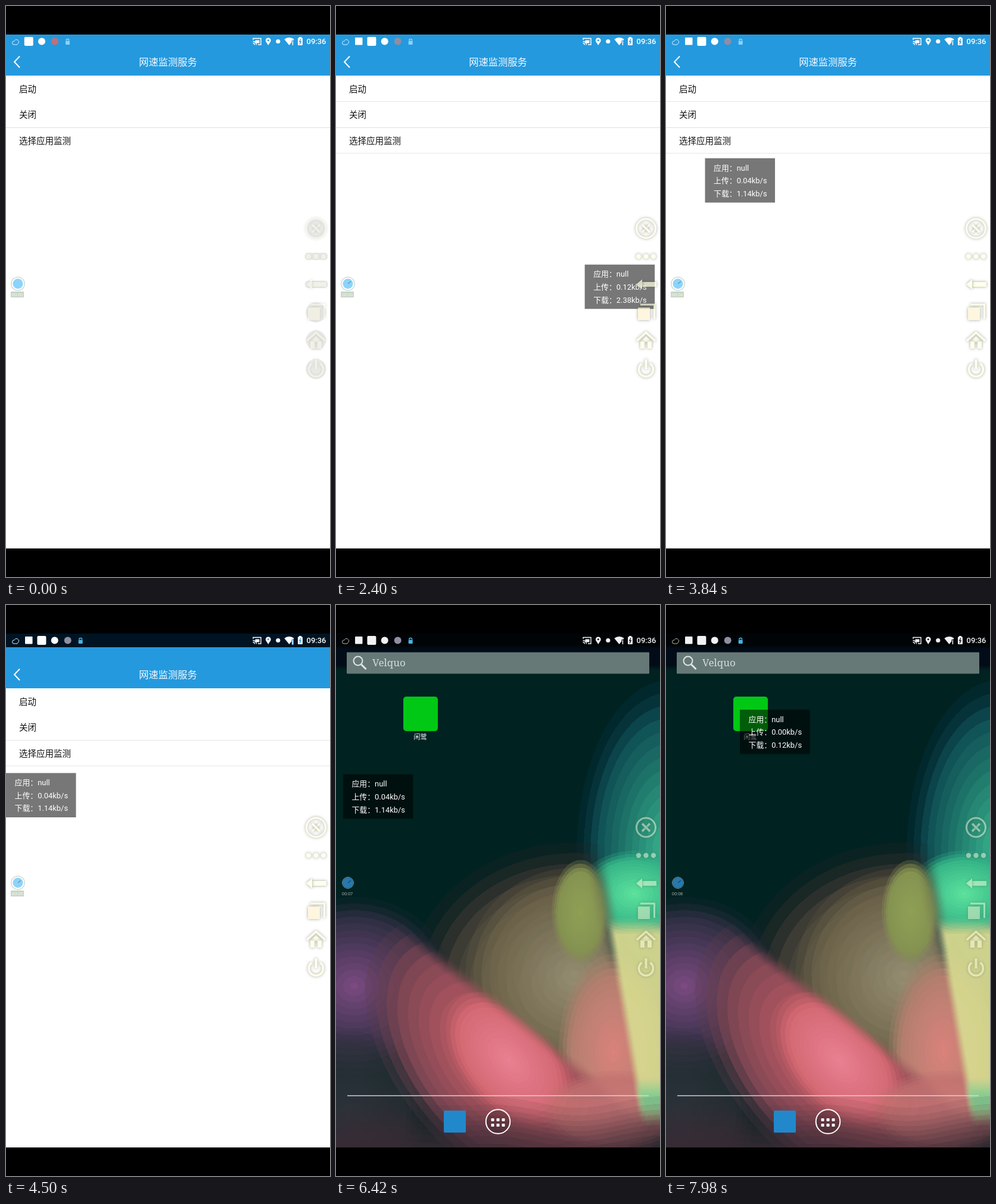
Write an HTML page with a canvas that moves like this. It is 544x960 px and loops after 8 s.

```html
<!DOCTYPE html>
<html lang="zh-CN">
<head>
<meta charset="utf-8">
<style>
html, body { margin: 0; width: 100%; height: 100%; overflow: hidden; background: #000; }
canvas { display: block; width: 544px; height: 960px; }
</style>
</head>
<body>
<canvas id="stage" width="544" height="960"></canvas>
<script>
const W = 544, H = 960, TOP = 48, BOTTOM = 912, LOOP = 8000;
const FONT = 'Roboto, "Noto Sans CJK SC", "Noto Sans CJK", sans-serif';
const BLUE = '#2499de', CREAM = '#ffffe2';
let g = document.getElementById('stage').getContext('2d');

const mix = (a, b, k) => a + (b - a) * k;
const clamp = v => Math.max(0, Math.min(1, v));
const smooth = (from, to, v) => {
  const k = clamp((v - from) / (to - from));
  return k * k * (3 - 2 * k);
};

function box(x, y, w, h, color, r = 0) {
  g.fillStyle = color;
  g.beginPath();
  g.roundRect(x, y, w, h, r);
  g.fill();
}
function dot(x, y, r, color) {
  g.fillStyle = color;
  g.beginPath();
  g.arc(x, y, r, 0, 7);
  g.fill();
}
function ring(x, y, r, color, width, from = 0, to = Math.PI * 2) {
  g.strokeStyle = color;
  g.lineWidth = width;
  g.beginPath();
  g.arc(x, y, r, from, to);
  g.stroke();
}
function trace(points) {
  g.beginPath();
  points.forEach(([x, y]) => g.lineTo(x, y));
}
function poly(points, color) {
  trace(points);
  g.fillStyle = color;
  g.fill();
}
function line(points, color, width) {
  trace(points);
  g.strokeStyle = color;
  g.lineWidth = width;
  g.stroke();
}
function text(str, x, y, size, color, align = 'left', weight = 400, family = FONT) {
  g.font = `${weight} ${size}px ${family}`;
  g.textAlign = align;
  g.fillStyle = color;
  g.fillText(str, x, y);
}
function layer(draw) {
  const c = document.createElement('canvas');
  c.width = W;
  c.height = H;
  const previous = g;
  g = c.getContext('2d');
  draw();
  g = previous;
  return c;
}

// ---- Wallpaper: banded elliptical glows, cut by soft edges ----
const bands = (k, n = 14) => Math.round(k * n) / n;

function shade(x, y) {
  const c = [0, 34, 33];
  const blend = (color, k) => color.forEach((v, i) => { c[i] = mix(c[i], v, k); });
  function glow(cx, cy, rx, ry, rim, core, mask = 1, skew = 0) {
    const dx = x - cx, dy = y - cy - skew * dx;
    const k = bands(1 - Math.hypot(dx / rx, dy / ry));
    if (k <= 0) return;
    blend(rim.map((v, i) => mix(v, core[i], k)), clamp(k * 4) * mask);
  }
  const ridge = 555 + .8 * (x - 130);
  const belowRidge = smooth(-14, 26, y - ridge);
  const wingEdge = 462 + .17 * (y - 560);
  const archSide = 1 - smooth(-25, 20, x - Math.max(432, wingEdge));

  // green fan
  glow(560, 415, 162, 300, [0, 44, 64], [58, 185, 145]);
  glow(500, 485, 100, 75, [40, 165, 128], [92, 226, 156]);
  // olive arch
  glow(400, 640, 290, 250, [26, 26, 30], [146, 140, 106], archSide);
  glow(400, 620, 190, 185, [105, 92, 62], [150, 142, 116], archSide * .75);
  glow(410, 515, 50, 90, [130, 142, 80], [142, 160, 84], archSide);
  // violet and red hills
  glow(30, 640, 170, 155, [20, 36, 44], [122, 74, 128]);
  glow(20, 860, 130, 150, [40, 46, 52], [62, 58, 68], .7);
  glow(465, 750, 95, 170, [165, 125, 105], [218, 130, 124]);
  glow(290, 770, 250, 225, [84, 56, 72], [235, 106, 112], belowRidge, .5);
  glow(290, 765, 110, 105, [206, 98, 106], [232, 128, 146], belowRidge, .5);
  glow(470, 850, 130, 70, [190, 110, 108], [205, 122, 122], .8);
  // yellow wing, green at its foot
  const wing = smooth(-8, 10, x - wingEdge) * smooth(522, 556, y) * (1 - smooth(835, 880, y));
  blend([214, 215, 142], bands(wing) * .95);
  blend([134, 204, 144], wing * smooth(790, 830, y));
  // folds along the bottom
  const fold = y + 9 * Math.sin(x / 85) + 5 * Math.sin(x / 37);
  blend([58, 42, 52], bands(smooth(815, 925, fold), 9) * .82);
  // shaded top
  blend([2, 12, 24], 1 - smooth(100, 110, y));
  blend([0, 4, 6], 1 - smooth(66, 74, y));
  return c;
}
function wallpaper() {
  const image = g.createImageData(W, BOTTOM - TOP);
  for (let i = 0; i < image.data.length; i += 4) {
    const n = i / 4;
    image.data.set([...shade(n % W, TOP + Math.floor(n / W)), 255], i);
  }
  g.putImageData(image, 0, TOP);
}

const home = layer(() => {
  wallpaper();
  box(18, 79.5, 508, 36, '#667976', 1);
  ring(37, 94, 7.5, '#dfe6e4', 2);
  line([[42.5, 100], [50.5, 108]], '#dfe6e4', 3);
  text('Velquo', 61, 103, 17, '#d3dbd9', 'left', 400, '"Noto Serif", serif');
  box(113, 154, 58, 58, '#00c814', 5);
  text('闲鹭', 141.5, 226, 11, '#fff', 'center', 500);
  box(19, 824, 506, 2, 'rgba(225,215,215,.7)');
  box(181, 850, 37, 37, '#2188cc', 2);
  dot(272, 868.5, 20, 'rgba(40,20,30,.25)');
  ring(272, 868.5, 20.3, '#fff', 2);
  for (let i = 0; i < 6; i++) box(260.5 + i % 3 * 9, 863 + (i > 2) * 9, 5, 5, '#fff', 1);
});

// ---- Floating tool column ----
const tools = layer(() => {
  const cx = 520.5;
  g.shadowColor = 'rgba(80,90,76,.75)';
  g.shadowBlur = 5;
  ring(cx, 374, 16, CREAM, 3);
  [-1, 1].forEach(s => line([[cx - 6.5, 374 - 6.5 * s], [cx + 6.5, 374 + 6.5 * s]], CREAM, 3.5));
  [-1, 0, 1].forEach(s => dot(cx + 12.5 * s, 421, 4.2, CREAM));
  box(512, 464, 26, 8, CREAM);
  poly([[504, 468], [514, 459.5], [514, 476.5]], CREAM);
  line([[511, 502], [534.5, 502], [534.5, 526]], CREAM, 3);
  box(507, 507, 20, 21, '#fff3d4');
  poly([[510, 565], [cx, 555], [531, 565]], CREAM);
  [511, 523].forEach(x => box(x, 564, 7, 12, CREAM));
  line([[505, 563], [cx, 549], [536, 563]], CREAM, 3.5);
  ring(cx, 611, 12, CREAM, 3.5, -.95, Math.PI + .95);
  line([[cx, 594], [cx, 611]], CREAM, 4);
});

function toolColumn(smudged, onHome) {
  if (smudged) {
    [374, 515, 562, 610].forEach(y => dot(520.5, y, 17, '#ececea'));
    [421, 468].forEach(y => box(502, y - 6, 38, 12, '#ececea', 5));
  }
  g.globalAlpha = smudged ? .3 : onHome ? .48 : .72;
  g.drawImage(tools, 0, 0);
  g.globalAlpha = 1;
}

// ---- Status bar ----
function statusBar(t, onHome) {
  const early = t < 1200, white = onHome ? '#f2f2f2' : '#fff';
  const back = onHome ? '#071014' : BLUE;
  const faint = onHome ? '#b8b8a8' : '#d8efff';
  ring(13.5, 62, 3, faint, 1, 1.6, 5);
  ring(17.5, 60.5, 4, faint, 1, 3.6, 7.6);
  line([[13, 65], [19, 65]], faint, 1);

  const shift = early ? 0 : 21.7;
  if (!early) box(32, 53, 12.5, 12.5, white, 1);
  box(30.7 + shift, 52, 15, 15, white, 2);
  dot(60 + shift, 59.5, 6, white);
  dot(82 + shift, 59.5, 6, early ? '#c0707a' : '#8f8ea2');
  const lock = t > 4400 ? '#46b4e4' : '#8fd0f5';
  box(100 + shift, 58.5, 7, 6.5, lock, 1);
  ring(103.5 + shift, 58, 2.5, lock, 1.5, Math.PI, 0);

  // casting, place, radio
  line([[415, 57], [415, 54.5], [428, 54.5], [428, 65], [423, 65]], white, 1.4);
  box(418.5, 57.5, 7, 5, white);
  [3, 6].forEach(r => ring(414.5, 65.5, r, white, 1.3, -1.57, 0));
  dot(440.3, 57.8, 4.4, white);
  poly([[436.3, 59.5], [444.3, 59.5], [440.3, 66]], white);
  dot(440.3, 57.8, 1.5, back);
  dot(456.8, 59.5, 3.6, white);
  // signal and battery
  g.fillStyle = white;
  g.beginPath();
  g.moveTo(475.5, 66);
  g.arc(475.5, 66, 13, -2.25, -.89);
  g.fill();
  box(479.5, 58, 3.5, 9, back);
  box(480.7, 59, 1.4, 7, white);
  box(490, 53.5, 8, 12.5, white, 1);
  box(492, 52, 4, 2, white);
  line([[495, 55.5], [492.8, 60], [495.2, 60], [493, 64.5]], back, 1.3);
  text('09:36', 504.5, 64.2, 13, white, 'left', 500);
}

// ---- Settings page ----
function settings(t) {
  const dy = t >= 4440 ? 23 : 0;
  box(0, TOP, W, BOTTOM - TOP, '#fff');
  box(0, TOP, W, 69 + dy, BLUE);
  if (dy) box(0, TOP, W, dy, '#001322');
  line([[23, 84.5 + dy], [14, 94 + dy], [23, 103.5 + dy]], '#fff', 2);
  text('网速监测服务', 272, 99.5 + dy, 16.3, '#f4faff', 'center');
  if (t >= 1000 && t < 1600) {
    box(0, 118, W, 42, '#ffffe8');
    box(15, 118, 526, 42, '#eee');
  }
  ['启动', '关闭', '选择应用监测'].forEach((label, i) => {
    text(label, 22, 144.5 + i * 43.6 + dy, 14.5, '#111');
    const hidden = t < 180 ? i !== 1 : dy && i === 0;
    if (!hidden) box(0, Math.floor(160.5 + 43.5 * i) + dy, W, 1, i === 1 && !dy ? '#d3e8cc' : '#e6e6e6');
  });
}

// ---- Recorder badge ----
function recorder(t, onHome) {
  const label = '00:0' + Math.floor(t / 1000 + .6);
  if (onHome) {
    ring(20, 467, 9.5, '#7f9096', 1);
    dot(20, 467, 9, '#2679ae');
  } else {
    dot(20, 467, 12, '#d3ddd3');
    dot(20, 467, 10.5, '#fff');
    dot(20, 467, 8.5, '#8bd4fb');
    box(8, 480, 22, 10, '#c9d5c8', 1);
  }
  if (t > 1800) line([[20, 467], [25, 463]], onHome ? '#174a70' : '#7a93a8', 1.4);
  text(label, 19, 487.6, 7.5, onHome ? '#a5aaa8' : '#f5faf3', 'center');
}

// ---- Speed overlay: [arrival, x, y, upload, download], dragged during the time before ----
const STOPS = [
  [1800, 426, 443, '0.12', '2.38'],
  [3200, 187, 207, '0.12', '2.38'],
  [4200, 0, 282.5, '0.04', '1.14'],
  [7200, 242, 328, '0.04', '1.91'],
  [7960, 124, 176, '0.00', '0.12']
];
const DRAG = 900;

function overlay(t) {
  if (t < 1200) return;
  const waiting = t < STOPS[0][0];
  const i = STOPS.findIndex(stop => t < stop[0]);
  const to = STOPS.at(i), from = i > 0 ? STOPS[i - 1] : to;
  const k = smooth(Math.max(from[0], to[0] - DRAG), to[0], t);
  const x = waiting ? 457 : mix(from[1], to[1], k), y = mix(from[2], to[2], k);
  const [, , , up, down] = k < .5 ? from : to;
  const rows = waiting
    ? ['应用：null', '上传速度', '下载速度']
    : ['应用：null', `上传：${up}kb/s`, `下载：${down}kb/s`];
  box(x, y, 117.5, 74.5, 'rgba(0,0,0,.535)');
  rows.forEach((row, n) => text(row, x + 14.5, y + 20.5 + n * 21.7, 12.9, '#fff'));
}

function frame(t) {
  const leave = clamp((t - 4560) / 300), onHome = leave > .5;
  g.drawImage(home, 0, 0);
  g.globalAlpha = 1 - clamp((t - 5400) / 500);
  box(222, 823.5, 99, 2.5, '#fff');
  g.globalAlpha = 1 - leave;
  settings(t);
  g.globalAlpha = 1;
  statusBar(t, onHome);
  overlay(t);
  recorder(t, onHome);
  toolColumn(t < 180, onHome);
  box(0, 0, W, TOP, '#000');
  box(0, BOTTOM, W, H - BOTTOM, '#000');
}

const start = performance.now();
function loop() {
  frame((performance.now() - start) % LOOP);
  requestAnimationFrame(loop);
}
loop();
</script>
</body>
</html>
```
